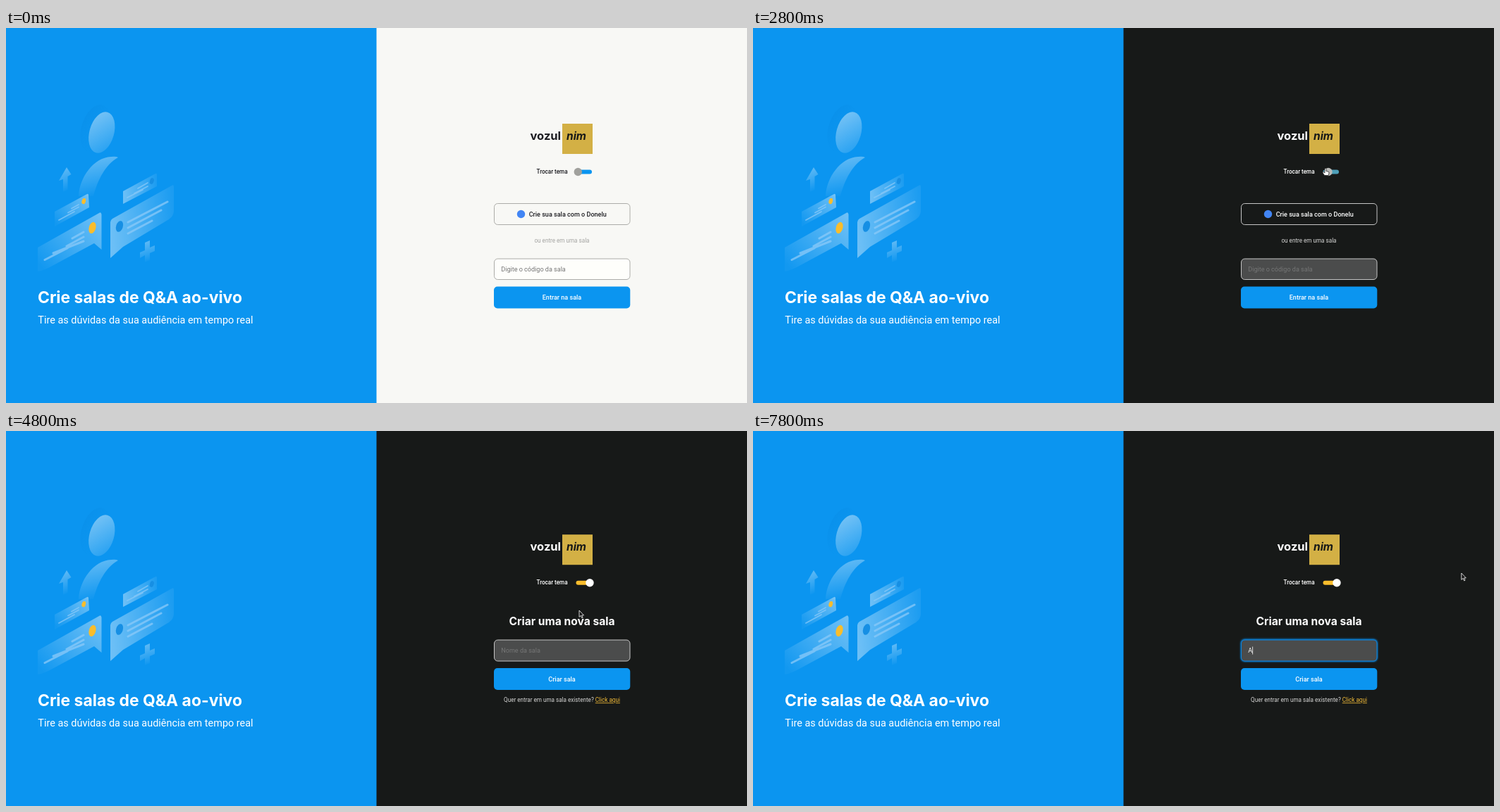
An HTML page for the animation above (8000 ms loop, 1051 by 533 pixels).

```html
<!DOCTYPE html>
<html lang="pt-BR">
<head>
<meta charset="utf-8">
<title>Salas de perguntas</title>
<style>
html, body { margin: 0; height: 100%; overflow: hidden; background: #0b95f0; }
svg {
  display: block; width: 100vw; height: 100vh; font: 9.05px Roboto, sans-serif;
  --bg: #f8f8f5; --ink: #1d1d22; --soft: #a5a5a3; --line: #acaca8; --field: #fefefb; --hint: #757575;
}
svg.dark { --bg: #171918; --ink: #fff; --soft: #d6d6d5; --line: #c6c6c6; --field: #4b4c4c; --hint: #757676; }
.head { font-family: Inter, sans-serif; font-weight: 700; }
.med { font-weight: 500; }
.small { font-size: 8.13px; }
.mid { text-anchor: middle; }
.ink { fill: var(--ink); }
.soft { fill: var(--soft); }
.hint { fill: var(--hint); }
.field { fill: var(--field); stroke: var(--line); }
.white { fill: #fff; }
.lines { stroke: #8bcaf8; stroke-opacity: .75; stroke-width: 3; stroke-linecap: round; fill: none; }
.thin { stroke-width: 1.7; }
</style>
</head>
<body>
<svg id="stage" viewBox="0 0 1051 533" preserveAspectRatio="none">
  <defs>
    <linearGradient id="fade" x1=".1" y1="0" x2=".75" y2="1">
      <stop stop-color="#fff" stop-opacity=".46"/><stop offset="1" stop-color="#fff" stop-opacity=".12"/>
    </linearGradient>
    <linearGradient id="down" x1=".4" y1="0" x2=".6" y2="1">
      <stop stop-color="#fff" stop-opacity=".36"/><stop offset="1" stop-color="#fff" stop-opacity="0"/>
    </linearGradient>
    <linearGradient id="left" x1="1" y1="0" x2="0" y2=".85">
      <stop stop-color="#fff" stop-opacity=".42"/><stop offset="1" stop-color="#fff" stop-opacity=".03"/>
    </linearGradient>
    <linearGradient id="right" x1="0" y1=".5" x2="1" y2=".4">
      <stop stop-color="#fff" stop-opacity=".4"/><stop offset="1" stop-color="#fff" stop-opacity=".07"/>
    </linearGradient>
    <linearGradient id="shade" x1="0" y1="0" x2="1" y2=".5">
      <stop stop-color="#0584dd" stop-opacity=".32"/><stop offset="1" stop-color="#0b95f0" stop-opacity="0"/>
    </linearGradient>
    <filter id="glow" x="-10%" y="-30%" width="120%" height="160%"><feGaussianBlur stdDeviation="1"/></filter>
  </defs>

  <rect width="526" height="533" fill="#0b95f0"/>
  <g id="art">
    <ellipse cx="127" cy="143" rx="20" ry="35" transform="rotate(17 127 143)" fill="url(#shade)"/>
    <ellipse cx="135.8" cy="148.5" rx="17.4" ry="30" transform="rotate(16 135.8 148.5)" fill="url(#fade)"/>
    <path d="M103 239C104 213 124 184 149 183Q156 182 159 184C141 194 130 216 124 239Z" fill="url(#down)"/>
    <path d="M86 198L92.5 208 87.5 211V230L81 233V215L75 217Z" fill="url(#down)"/>
    <path d="M69 261L115 236Q117 235 117 238L118 255 69 282Z" fill="url(#left)"/>
    <path d="M166 232L212 207Q214 206 214 209V225L166 250Z" fill="url(#right)"/>
    <path d="M45 312L132 263Q135 261 135.5 265V315L125 306 62 340Q52 345 45 346Z" fill="url(#left)"/>
    <path d="M148 276Q148 273 151 271L235 224Q238 222 238 226V260Q238 267 231 272L166 311 148 327Z" fill="url(#right)"/>
    <path d="M197 305L204 302V312L211 309V317L204 320V330L197 333V323L190 327V319L197 316Z" fill="url(#down)"/>
    <path class="lines" d="M94 299L110 290M86 310L110 297M67 320L110 303M55 329.5L87 313M173 276L229 247M173 284L220 259M173 292L207 274"/>
    <path class="lines thin" d="M93 256.500L103 251M88 262.500L103 254.500M75 273L97 261M187 228L201 220M182 235L201 225M172 241L194 230"/>
    <g fill="#f9bd2c">
      <ellipse cx="110.300" cy="246" rx="2.700" ry="4.200" transform="rotate(17 110 246)"/>
      <ellipse cx="122.500" cy="283.800" rx="4.800" ry="8.300" transform="rotate(16 122 284)"/>
    </g>
    <g fill="#168fe4">
      <ellipse cx="207" cy="217.500" rx="2.800" ry="4.500" transform="rotate(17 207 217)"/>
      <ellipse cx="161" cy="282" rx="4.800" ry="8" transform="rotate(17 161 282)"/>
    </g>
  </g>
  <text class="head white" x="45" y="390.500" font-size="22.900">Crie salas de Q&amp;A ao-vivo</text>
  <text class="white" x="45.300" y="419.500" font-size="14.450">Tire as dúvidas da sua audiência em tempo real</text>

  <rect x="525.500" width="526" height="533" fill="var(--bg)"/>
  <g id="top">
    <rect x="789" y="136" width="43" height="43" fill="#d3b045"/>
    <text class="head ink" x="743.500" y="158.800" font-size="16.500">vozul</text>
    <text class="head" x="795" y="158.800" font-size="15.500" font-style="italic" fill="#171918">nim</text>
    <text class="ink med small" x="752.500" y="207.300">Trocar tema</text>
    <rect id="track" x="808.500" y="201.500" width="22.500" height="6" rx="3"/>
    <circle id="ring" cy="204.500" r="7.500" fill="#4fc3ee"/>
    <circle id="thumb" cy="204.500" r="5.700"/>
  </g>

  <g id="entry">
    <rect id="halo" x="691.500" y="248" width="194.500" height="32.500" rx="6" fill="#e52c3c" filter="url(#glow)"/>
    <rect x="692.500" y="249.500" width="192.500" height="30" rx="5" fill="none" stroke="var(--line)"/>
    <rect id="hot" x="692" y="249" width="193.500" height="31" rx="5.500" fill="#e52c3c"/>
    <circle id="badge" cx="730.500" cy="264.500" r="5.700"/>
    <text class="ink med" x="741.700" y="267.800">Crie sua sala com o Donelu</text>
    <text class="soft small mid" x="788.500" y="305">ou entre em uma sala</text>
    <rect class="field" x="692.500" y="328" width="192.500" height="29.500" rx="5"/>
    <text class="hint" x="702.300" y="345.800">Digite o código da sala</text>
    <rect x="692" y="367.500" width="193.300" height="31" rx="5" fill="#0b95f0"/>
    <text class="white med mid" x="788.500" y="386.300">Entrar na sala</text>
  </g>

  <g id="create">
    <text class="head ink mid" x="788.500" y="276.200" font-size="15.600">Criar uma nova sala</text>
    <rect id="focus" x="691.500" y="295.500" width="194.500" height="32.500" rx="6" fill="#0b85e0" filter="url(#glow)"/>
    <rect id="name" class="field" x="692.500" y="297" width="192.500" height="30" rx="5"/>
    <text id="hint" class="hint" x="702.300" y="315.300">Nome da sala</text>
    <text id="typed" class="white" x="702.300" y="315.300">A</text>
    <rect id="caret" y="306.500" width=".8" height="11" fill="#fff"/>
    <rect x="692" y="337" width="193.300" height="31" rx="5" fill="#0b95f0"/>
    <text class="white med mid" x="788.500" y="355.800">Criar sala</text>
    <text class="soft small mid" x="788.500" y="385.300">Quer entrar em uma sala existente? <tspan fill="#f4bd38" text-decoration="underline">Click aqui</tspan></text>
  </g>

  <g id="cursor" stroke-linejoin="round">
    <path id="arrow" d="M0 0V9.400L2.200 7.400 3.800 10.800 5.200 10.200 3.700 6.900H6.500Z" fill="#151515" stroke="#fff" stroke-width=".8"/>
    <path id="hand" d="M-1 .8a1 1 0 0 1 2 0V4L4 4.600Q5.300 5 5 6.500L4.300 10H-1.300L-4 6.400Q-4.300 5 -3 5.100L-1 6.500Z" fill="#fff" stroke="#222" stroke-width=".8"/>
    <path id="beam" d="M-2-4.300Q0-4.300 0-3.300Q0-4.300 2-4.300M0-3.300V3.300M-2 4.300Q0 4.300 0 3.300Q0 4.300 2 4.300" fill="none" stroke="#e0e0e0" stroke-width=".9"/>
  </g>
</svg>
<script>
const LOOP = 8000, STEP = 100;
const $ = id => document.getElementById(id);
const show = (id, on) => $(id).style.display = on ? '' : 'none';
const put = (id, attrs) => { for (const k in attrs) $(id).setAttribute(k, attrs[k]); };
const mix = (a, b, k) => `rgb(${a.map((v, i) => Math.round(v + (b[i] - v) * k))})`;

// Pointer path: time, x, y
const path = [
  [900, 283, 63], [1000, 440, 116], [1100, 588, 162], [1200, 700, 190], [1300, 765, 203],
  [1400, 805, 208], [1500, 824, 209], [1600, 824, 209], [1700, 827, 209.5], [1900, 827, 209.5],
  [2000, 812, 199.5], [3200, 812, 199.5], [3300, 825, 200], [3400, 825, 200], [3500, 821, 222],
  [3600, 812, 250], [3700, 808, 258.5], [4700, 808, 258.5], [4800, 813, 255], [4900, 818, 252.5],
  [5000, 818, 252.5], [5100, 846, 257], [5200, 890, 268], [5300, 915, 285], [5400, 905, 302],
  [5500, 881, 313], [5600, 860, 317], [5700, 847, 318], [6300, 847, 318], [6400, 862, 309],
  [6500, 908, 272], [6600, 957, 234], [6700, 991, 210], [6800, 1004.8, 202]
];
const slide = [[2700, 0], [2800, .28], [2900, .74], [3000, 1]];
const heat = [[3500, 0], [3600, .55], [3700, 1]];

// Linear value between the keys around t
function at(keys, t) {
  const n = keys.findIndex(k => k[0] > t);
  if (n < 0) return keys[keys.length - 1].slice(1);
  if (n === 0) return keys[0].slice(1);
  const a = keys[n - 1], b = keys[n], u = (t - a[0]) / (b[0] - a[0]);
  return a.slice(1).map((v, i) => v + (b[i + 1] - v) * u);
}

function draw(t) {
  const dark = t >= 2800, second = t >= 4800, typed = t >= 7800, focused = t >= 6200;
  $('stage').classList.toggle('dark', dark);
  show('entry', !second);
  show('create', second);
  put('top', { transform: `translate(0 ${second ? 11.2 : 0})` });

  const [k] = at(slide, t), cx = 811.3 + 16.7 * k;
  put('track', { fill: mix([11, 149, 240], [249, 189, 44], k) });
  put('thumb', { cx, fill: mix([161, 161, 157], [255, 255, 255], k) });
  put('ring', { cx });
  show('ring', t === 2700);

  const [h] = at(heat, t);
  put('hot', { opacity: h });
  put('badge', { fill: mix([66, 133, 244], [255, 255, 255], h) });
  show('halo', t >= 4400);

  show('focus', focused);
  $('name').style.stroke = focused ? '#0b85e0' : '';
  show('hint', !typed);
  show('typed', typed);
  show('caret', focused && (t < 6800 || t >= 7400));
  put('caret', { x: typed ? 708.3 : 702.3 });

  const [x, y] = at(path, t);
  const hand = t >= 2000 && t < 3500 || t >= 3600 && t < 4800;
  const beam = second && x > 692 && x < 885 && y > 297 && y < 327;
  show('cursor', t >= 900);
  put('cursor', { transform: `translate(${x} ${y})` });
  show('hand', hand);
  show('beam', beam);
  show('arrow', !hand && !beam);
}

const start = performance.now();
function tick() {
  const t = (performance.now() - start) % LOOP;
  draw(Math.floor(t / STEP) * STEP);
  requestAnimationFrame(tick);
}
tick();
</script>
</body>
</html>
```
